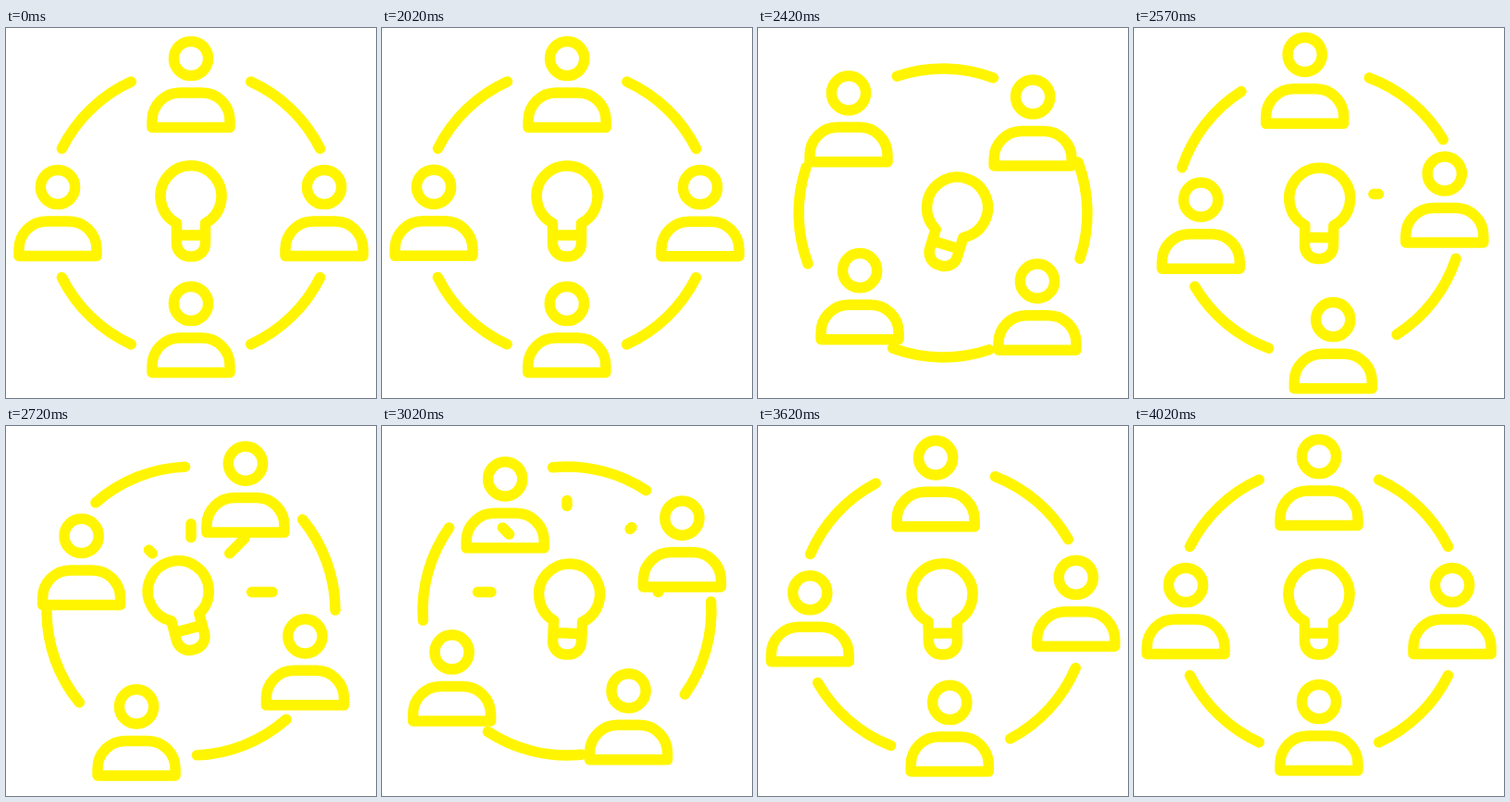
An HTML page for the animation above (4050 ms loop, 400 by 400 pixels).

```html
<!DOCTYPE html>
<html lang="en">
<head>
<meta charset="utf-8">
<title>Shared idea</title>
<style>
  html, body { margin: 0; width: 100%; height: 100%; overflow: hidden; background: #fff; }
  svg { display: block; width: 100vw; height: 100vh; }
</style>
</head>
<body>
<svg viewBox="0 0 400 400" fill="none" stroke="#fff500" stroke-width="11.5" stroke-linecap="round" stroke-linejoin="round">
  <defs>
    <g id="person">
      <circle cy="-28" r="18.6"/>
      <path d="M-42 46.5V39a30 30 0 0 1 30-30H12a30 30 0 0 1 30 30V46.5Z"/>
    </g>
  </defs>
  <g id="ring"></g>
  <g id="rays"></g>
  <g id="bulb">
    <path d="M184.5 211A33 33 0 1 1 215.5 211V233a14 14 0 0 1-14 14h-3a14 14 0 0 1-14-14ZM184.5 224H215.5"/>
  </g>
  <g id="people"></g>
</svg>
<script>
const LOOP = 4050, START = 2000, SPAN = 2000;
const $ = id => document.getElementById(id);
const clamp = v => Math.min(1, Math.max(0, v));
const mix = (a, b, k) => a + (b - a) * k;
const sine = k => 0.5 - 0.5 * Math.cos(Math.PI * k);
const quadOut = k => 1 - (1 - k) ** 2;

function add(parent, tag, attrs) {
  const el = document.createElementNS('http://www.w3.org/2000/svg', tag);
  for (const name in attrs) el.setAttribute(name, attrs[name]);
  return $(parent).appendChild(el);
}

function polar(cx, cy, r, deg) {
  const a = deg * Math.PI / 180;
  return [cx + r * Math.cos(a), cy + r * Math.sin(a)];
}

// cubic-bezier(.333, 0, .13, 1), solved by bisection
function spin(x) {
  if (x <= 0 || x >= 1) return clamp(x);
  let lo = 0, hi = 1;
  for (let i = 0; i < 30; i++) {
    const s = (lo + hi) / 2, q = 1 - s;
    if (3 * s * q * q * 0.333 + 3 * s * s * q * 0.13 + s ** 3 < x) lo = s; else hi = s;
  }
  return lo * lo * (3 - 2 * lo);
}

// [progress, tilt in degrees, vertical shift]
const SWING = [
  [0, 0, 0], [0.21, 17, 10], [0.36, -15, -5],
  [0.51, 2.8, 0], [0.81, -1, 0], [1, 0, 0]
];
function swing(k) {
  const i = Math.max(1, SWING.findIndex(row => row[0] >= k));
  const a = SWING[i - 1], b = SWING[i];
  const e = sine(clamp((k - a[0]) / (b[0] - a[0])));
  return [mix(a[1], b[1], e), mix(a[2], b[2], e)];
}

for (const mid of [-46, 46, 134, 226]) {
  const from = polar(200, 200, 156, mid - 19.5), to = polar(200, 200, 156, mid + 19.5);
  add('ring', 'path', { d: `M${from}A156 156 0 0 1 ${to}` });
}

// resting angle, distance before and after the half turn
const people = [[-90, 139, 126], [0, 144, 144], [90, 126, 139], [180, 144, 144]]
  .map(([angle, r0, r1]) => ({ angle, r0, r1, el: add('people', 'use', { href: '#person' }) }));

const rays = [0, -45, -90, -135, -180]
  .map((angle, i) => ({ angle, begin: 2530 + 50 * i, el: add('rays', 'path', {}) }));

function drawRay({ angle, begin, el }, t) {
  const head = quadOut(clamp((t - begin - 15) / 370));
  const tail = quadOut(clamp((t - begin - 158) / 380));
  const shown = head > 0 && tail < 1;
  el.setAttribute('d', shown
    ? `M${polar(200, 179.5, mix(59, 99, tail), angle)}L${polar(200, 179.5, mix(59, 99, head), angle)}`
    : '');
}

function draw(t) {
  const k = clamp((t - START) / SPAN);
  const turn = 180 * spin(k);
  // the half turn lands on an identical layout
  $('ring').setAttribute('transform', `rotate(${turn} 200 200)`);
  for (const p of people) {
    const at = polar(200, 200, mix(p.r0, p.r1, sine(k)), p.angle + turn);
    p.el.setAttribute('transform', `translate(${at})`);
  }
  const [tilt, dy] = swing(k);
  $('bulb').setAttribute('transform', `translate(0 ${dy}) rotate(${tilt} 200 235)`);
  for (const ray of rays) drawRay(ray, t);
}

const origin = performance.now();
function tick() {
  draw((performance.now() - origin) % LOOP);
  requestAnimationFrame(tick);
}
tick();
</script>
</body>
</html>
```
